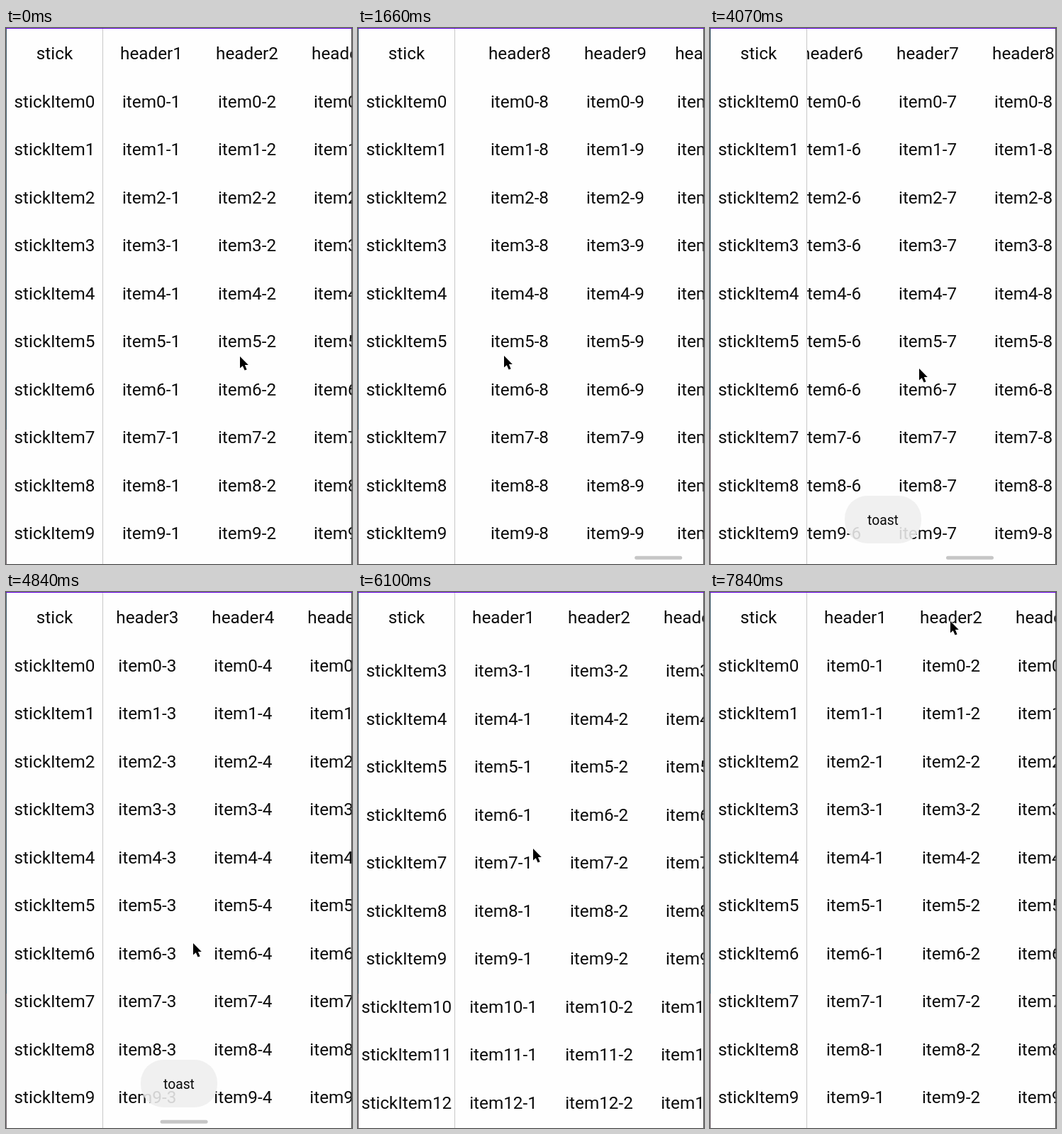
Write an HTML page with a canvas that moves like this. It is 488 px wide and 754 px high and loops after 8000 ms.

```html
<!DOCTYPE html>
<html lang="en">
<head>
<meta charset="utf-8">
<title>Sticky table</title>
<style>
  html, body { margin: 0; width: 100%; height: 100%; overflow: hidden; background: #fefefe; }
  canvas { display: block; width: 488px; height: 754px; }
</style>
</head>
<body>
<canvas id="stage" width="488" height="754"></canvas>
<script>
const ctx = document.getElementById('stage').getContext('2d');
const W = 488, H = 754, LOOP = 8000;
const COL = 135, ROW = 67.5, LEFT = 137.5, STICK_X = 68.5, HEAD_BASE = 44, HEAD_BOTTOM = 69;
const COLUMNS = 10, MAX_SCROLL = 1000;

const progress = (t, from, to) => Math.min(1, Math.max(0, (t - from) / (to - from)));
const smooth = u => u * u * (3 - 2 * u);
const easeOut = u => 1 - (1 - u) ** 2;
const mix = (a, b, u) => a + (b - a) * u;
const visible = (t, from, to) => progress(t, from, from + 200) - progress(t, to, to + 200);

// One fling to the far end, then a slow drag back; later one pull up and down.
const scrollX = t =>
  MAX_SCROLL * (easeOut(progress(t, 600, 2072)) - smooth(progress(t, 3144, 5737)));
const scrollY = t => Math.round(268 * Math.sin(Math.PI * progress(t, 5700, 7250)));

// Pointer stops: time, x, y
const stops = [
  [500, 330, 462], [1660, 206, 461], [2410, 147, 469], [4070, 295, 479],
  [4840, 264, 494], [5700, 247, 556], [7300, 247, 556], [7800, 339, 41]
];

function pointer(t) {
  const next = stops.findIndex(stop => t < stop[0]);
  const b = stops.at(next), a = stops[Math.max(0, next - 1)];
  if (next <= 0) return b.slice(1);
  const u = smooth(progress(t, a[0], b[0]));
  return [mix(a[1], b[1], u), mix(a[2], b[2], u) - scrollY(t)];
}

function rect(x, y, w, h, color) {
  ctx.fillStyle = color;
  ctx.fillRect(x, y, w, h);
}

function pill(x, y, w, h, r, color) {
  ctx.fillStyle = color;
  ctx.beginPath();
  ctx.roundRect(x, y, w, h, r);
  ctx.fill();
}

function label(text, x, y, size = 24.3) {
  ctx.font = `${size}px Roboto, sans-serif`;
  ctx.fillStyle = '#0c0c0c';
  ctx.fillText(text, x, Math.floor(y));
}

function clipped(x, y, paint) {
  ctx.save();
  ctx.beginPath();
  ctx.rect(x, y, W - x, H - y);
  ctx.clip();
  paint();
  ctx.restore();
}

function faded(alpha, paint) {
  ctx.globalAlpha = alpha;
  paint();
  ctx.globalAlpha = 1;
}

function drawTable(sx, sy) {
  const firstRow = Math.floor(sy / ROW);
  const eachRow = paint => {
    for (let r = firstRow; r < firstRow + 12; r++) paint(r, HEAD_BASE + .5 + (r + 1) * ROW - sy);
  };
  const eachColumn = paint => {
    for (let c = 1; c <= COLUMNS; c++) paint(c, LEFT + (c - .5) * COL - sx);
  };
  label('stick', STICK_X, HEAD_BASE);
  clipped(0, HEAD_BOTTOM, () => eachRow((r, y) => label('stickItem' + r, STICK_X, y)));
  clipped(137, 0, () => eachColumn((c, x) => label('header' + c, x, HEAD_BASE)));
  clipped(137, HEAD_BOTTOM, () => eachColumn((c, x) =>
    eachRow((r, y) => label(`item${r}-${c}`, x, y))));
  rect(136, 0, 1, H, '#c8c8c8');
}

function drawToast() {
  pill(190, 658, 108, 67, 32, 'rgba(238,238,238,.88)');
  label('toast', 244, 699, 19.3);
}

const arrow = new Path2D('M0 0V16.5L3.8 13.2L6.6 19.6L9.6 18.4L6.9 12.1H11.8Z');

function drawPointer(x, y) {
  ctx.save();
  ctx.translate(x, y);
  ctx.lineWidth = 1.5;
  ctx.strokeStyle = '#fff';
  ctx.stroke(arrow);
  ctx.fillStyle = '#000';
  ctx.fill(arrow);
  ctx.restore();
}

function draw(t) {
  const sx = scrollX(t);
  rect(0, 0, W, H, '#fefefe');
  ctx.textAlign = 'center';
  drawTable(sx, scrollY(t));
  faded(visible(t, 600, 5800), () => pill(144 + sx * .267, 742.8, 67, 5, 2.5, '#c6c6c6'));
  rect(0, 0, 1, 565, '#466070');
  rect(0, 565, 1, H, '#756a72');
  rect(W - 1, 0, 1, H, '#555');
  rect(0, 0, W, 1, '#6200e0');
  faded(visible(t, 3300, 5350), drawToast);
  drawPointer(...pointer(t));
}

const start = performance.now();
function frame() {
  draw((performance.now() - start) % LOOP);
  requestAnimationFrame(frame);
}
frame();
</script>
</body>
</html>
```
